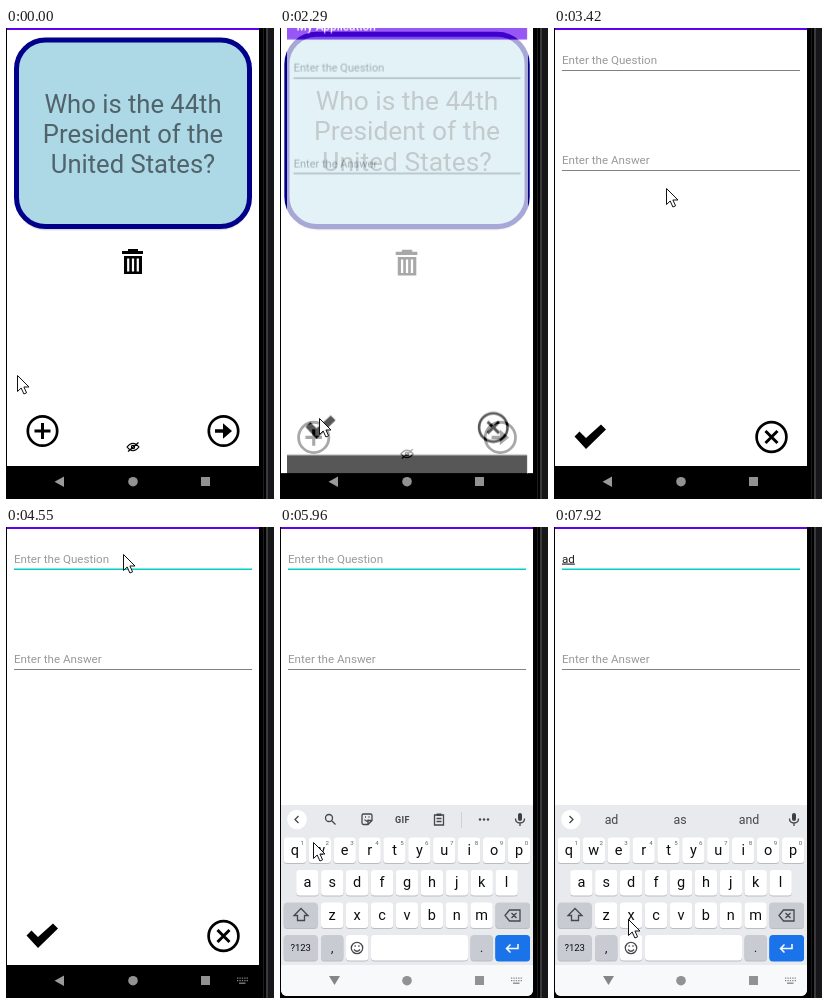
An HTML page for the animation above (8 s loop, 268 by 471 pixels).

```html
<!DOCTYPE html>
<html lang="en">
<head>
<meta charset="utf-8">
<title>Flashcard app</title>
<style>
html, body { margin: 0; width: 100%; height: 100%; overflow: hidden; background: #000; }
svg { display: block; width: 100vw; height: 100vh; font-family: Roboto, "Open Sans", sans-serif; }
.mid { text-anchor: middle; }
.hint { font-size: 11.6px; fill: #999; }
.typed { font-size: 11.6px; fill: #222; text-decoration: underline; }
.question { font-size: 25.6px; fill: #50636a; }
.ring { fill: none; stroke: #000; stroke-width: 2.7; }
.thin { fill: none; stroke: #44474b; stroke-width: 1.3; }
.word { font-size: 12.4px; fill: #44474b; }
.key { font-size: 14.5px; fill: #0c0d0f; }
.digit { font-size: 6.2px; fill: #5f6368; }

/* every state holds until the next one; 1% is 80 ms */
.anim { animation: 8s step-end -4ms infinite; }
#home { animation-name: home; }
#form { animation-name: form; }
#focus { animation-name: focus; }
#kbIcon { animation-name: kbIcon; }
#board { animation-name: board; }
.light { animation-name: light; }
.dark { animation-name: dark; }
#hintQ { animation-name: untilA; }
#tools { animation-name: untilWords; }
#a { animation-name: a; }
#ad { animation-name: ad; }
#words1 { animation-name: words1; }
#words2 { animation-name: words2; }
#words { animation-name: words; }
#caret { animation-name: caret; }
#mouse { animation-name: mouse; }

@keyframes home {
  0% { transform: none; opacity: 1; }
  28.625% { transform: matrix(1.031, 0, 0, 1.031, -3.9, -6.1); opacity: 1; }
  30.125%, 100% { transform: none; opacity: 0; }
}
@keyframes form {
  0% { transform: none; opacity: 0; }
  28.625% { transform: matrix(.953, 0, 0, .953, 6, 9.6); opacity: .66; }
  30.125% { transform: matrix(.998, 0, 0, .998, .25, .6); opacity: 1; }
  32%, 100% { transform: none; opacity: 1; }
}
@keyframes focus { 0% { opacity: 0; } 48.625%, 100% { opacity: 1; } }
@keyframes kbIcon { 0% { opacity: 0; } 55.75%, 100% { opacity: 1; } }
@keyframes board {
  0% { transform: translateY(200px); }
  58.75% { transform: translateY(70px); }
  60.625%, 100% { transform: none; }
}
@keyframes light { 0% { opacity: 0; } 58.75%, 100% { opacity: 1; } }
@keyframes dark { 0% { opacity: 1; } 58.75%, 100% { opacity: 0; } }
@keyframes untilA { 0% { opacity: 1; } 79.875%, 100% { opacity: 0; } }
@keyframes untilWords { 0% { opacity: 1; } 81.625%, 100% { opacity: 0; } }
@keyframes words { 0% { opacity: 0; } 81.625%, 100% { opacity: 1; } }
@keyframes a { 0% { opacity: 0; } 79.875% { opacity: 1; } 93.75%, 100% { opacity: 0; } }
@keyframes ad { 0% { opacity: 0; } 93.75%, 100% { opacity: 1; } }
@keyframes words1 { 0% { opacity: 1; } 95.5%, 100% { opacity: 0; } }
@keyframes words2 { 0% { opacity: 0; } 95.5%, 100% { opacity: 1; } }
@keyframes caret {
  0% { opacity: 0; transform: translateX(8px); }
  52.375% { opacity: 1; transform: translateX(8px); }
  55.75% { opacity: 0; transform: translateX(8px); }
  62.5% { opacity: 1; transform: translateX(8px); }
  68% { opacity: 0; transform: translateX(8px); }
  74.625% { opacity: 1; transform: translateX(8px); }
  79.875% { opacity: 1; transform: translateX(14px); }
  86.5% { opacity: 0; transform: translateX(14px); }
  92.25% { opacity: 1; transform: translateX(14px); }
  93.75% { opacity: 1; transform: translateX(20.5px); }
  99%, 100% { opacity: 0; transform: translateX(20.5px); }
}
@keyframes mouse {
  0% { transform: translate(11px, 347px); }
  1.625% { transform: translate(15px, 355px); }
  3.375% { transform: translate(25px, 371px); }
  5.125% { transform: translate(36px, 386px); }
  6.875% { transform: translate(39px, 390px); }
  39.375% { transform: translate(60px, 325px); }
  41.125% { transform: translate(112px, 160px); }
  43% { transform: translate(138px, 45px); }
  44.875% { transform: translate(117px, 27px); }
  66.25% { transform: translate(112px, 45px); }
  68% { transform: translate(96px, 100px); }
  69.625% { transform: translate(73px, 180px); }
  71.25% { transform: translate(50px, 258px); }
  73% { transform: translate(33px, 315px); }
  74.625% { transform: translate(25px, 342px); }
  76.375% { transform: translate(23px, 350px); }
  81.625% { transform: translate(34px, 352px); }
  83.375% { transform: translate(60px, 353px); }
  85.375% { transform: translate(73px, 352px); }
  97.25% { transform: translate(74px, 373px); }
  99%, 100% { transform: translate(74px, 392px); }
}
</style>
</head>
<body>
<svg viewBox="0 0 268 471" preserveAspectRatio="none">
  <defs>
    <clipPath id="screen"><rect x="1" y="-20" width="252" height="489" rx="6"/></clipPath>
  </defs>
  <rect width="268" height="471"/>

  <!-- phone edge -->
  <rect x="257" width="1" height="471" fill="#1c1c1e"/>
  <rect x="260" width="2" height="471" fill="#3a3a3d"/>
  <rect x="262" width="6" height="471" fill="#17171a"/>

  <g clip-path="url(#screen)">
    <g id="home" class="anim">
      <rect x="-8" y="-10" width="270" height="448" fill="#fff"/>
      <rect x="-8" y="-40" width="270" height="42" fill="#6200ee"/>
      <rect x="9" y="12" width="236" height="190.5" rx="31" fill="#000" opacity=".12"/>
      <rect x="10.5" y="12" width="233" height="186.5" rx="29" fill="#add8e6" stroke="#00008b" stroke-width="5"/>
      <g class="question mid">
        <text x="127" y="85">Who is the 44th</text>
        <text x="127" y="115">President of the</text>
        <text x="127" y="145">United States?</text>
      </g>
      <path d="M116 223h6v-2h10v2h5v3h-21zM118 228h18v18h-18z"/>
      <path d="M122.2 230.500v13M127 230.500v13M131.800 230.500v13" stroke="#fff" stroke-width="2.200"/>
      <circle class="ring" cx="36.500" cy="403" r="14.700"/>
      <path d="M36.500 395v16M28.500 403h16" stroke="#000" stroke-width="3"/>
      <circle class="ring" cx="217.500" cy="403" r="14.700"/>
      <path d="M209 401.300h8v-6l9 7.700-9 7.700v-6h-8z"/>
      <g fill="none" stroke="#000" stroke-width="1.200">
        <path d="M121 419q6-7.500 12 0q-6 7.500-12 0zM122 423.500l10.500-9"/>
        <circle cx="127" cy="419" r="1.600"/>
      </g>
      <rect x="-8" y="438" width="270" height="40"/>
    </g>

    <g id="form" class="anim">
      <rect x="1" y="0" width="252" height="438" fill="#fff"/>
      <rect x="1" y="-40" width="252" height="42" fill="#6200ee"/>
      <text x="11" y="-8" font-size="12.500" font-weight="500" fill="#fff">My Application</text>
      <text id="hintQ" class="hint anim" x="8" y="35.500">Enter the Question</text>
      <text class="hint" x="8" y="136">Enter the Answer</text>
      <path d="M8 42.500h238M8 142.500h238" stroke="#808080"/>
      <rect id="focus" class="anim" x="8" y="41.500" width="238" height="1.500" fill="#03d0c0"/>
      <path d="M20.500 408.500l5-5 6.500 6.500 15-13.500 5 5-20 19.500z"/>
      <circle class="ring" cx="217.500" cy="409" r="14.900"/>
      <path d="M211.500 403l12 12M223.500 403l-12 12" stroke="#000" stroke-width="3"/>
      <rect x="1" y="438" width="252" height="33"/>
    </g>

    <text id="a" class="typed anim" x="8" y="35.500">a</text>
    <text id="ad" class="typed anim" x="8" y="35.500">ad</text>
    <rect id="caret" class="anim" y="23" width="1.200" height="17" fill="#03d0c0"/>

    <g id="board" class="anim">
      <rect x="1" y="278" width="252" height="193" fill="#e8eaed"/>
      <circle cx="17" cy="292.500" r="9.800" fill="#fff"/>
      <g id="tools" class="anim">
        <path class="thin" d="M18.500 289l-3.500 3.500 3.500 3.500"/>
        <circle class="thin" cx="49" cy="291" r="3.500"/>
        <path class="thin" d="M51.500 293.500l4 4"/>
        <path class="thin" d="M82 288.500q0-1.500 1.500-1.500h7q1.500 0 1.500 1.500v5l-4 4h-4.500q-1.500 0-1.500-1.500zM92 293.500h-4v4M84.500 292.500q2 3 4 0M85 290h1M88.500 290h1"/>
        <text class="mid" x="122.500" y="295.500" font-size="9" font-weight="700" letter-spacing=".4" fill="#44474b">GIF</text>
        <path class="thin" d="M154.500 288h9v10h-9zM156.500 291.500h5M156.500 294.500h5"/>
        <rect x="156.500" y="286.500" width="5" height="2.500" fill="#44474b"/>
        <path d="M181.500 285v16" stroke="#cfd2d6"/>
        <g fill="#44474b"><circle cx="200" cy="292.500" r="1.200"/><circle cx="204" cy="292.500" r="1.200"/><circle cx="208" cy="292.500" r="1.200"/></g>
      </g>
      <g id="words" class="anim">
        <path class="thin" d="M15.500 289l3.500 3.500-3.500 3.500"/>
        <g id="words1" class="word mid anim">
          <text x="57.500" y="297">a</text><text x="126" y="297">and</text><text x="195" y="297">also</text>
        </g>
        <g id="words2" class="word mid anim">
          <text x="57.500" y="297">ad</text><text x="126" y="297">as</text><text x="195" y="297">and</text>
        </g>
      </g>
      <rect x="238" y="286" width="4" height="8" rx="2" fill="#3c4043"/>
      <path class="thin" d="M235.500 291.500q0 4.500 4.500 4.500t4.500-4.500M240 296v3"/>
      <g id="keys"></g>
      <path class="thin" d="M21 381.500l7 7h-3.500v5h-7v-5H14z"/>
      <path class="thin" d="M225 388.500l4.500-5.500h10.500v11h-10.500zM231.500 386l5 5M236.500 386l-5 5"/>
      <circle class="thin" cx="77" cy="421" r="5.700"/>
      <path class="thin" d="M74 422.500q3 3.500 6 0M74.500 419h1.300M78.300 419h1.300"/>
      <path d="M238 417v4.500h-11M230.500 417.500l-4 4 4 4" fill="none" stroke="#fff" stroke-width="1.500"/>
    </g>

    <!-- navigation bar -->
    <rect class="light anim" x="1" y="438" width="252" height="33" fill="#f8f9fa"/>
    <path class="light anim" d="M49 449h11l-5.500 9z" fill="#858585"/>
    <g class="dark anim">
      <rect x="1" y="445.500" width="252" height="26"/>
      <path d="M58 448.500v10.500l-9.500-5.250z" fill="#9a9a9a"/>
    </g>
    <circle cx="127" cy="453.700" r="4.800" fill="#929292"/>
    <rect x="195" y="449" width="9" height="9" fill="#929292"/>
    <g id="kbIcon" class="anim" stroke="#858585" stroke-width="1.300">
      <path d="M231 451.200h11M231 453.700h11" stroke-dasharray="1.300 1.100"/>
      <path d="M233 456.200h6.500"/>
    </g>
  </g>

  <path id="mouse" class="anim" d="M.5 .5v16l3.700-3.500 2.700 6 2.700-1.200-2.700-5.800h5.100z" fill="#fff" stroke="#111" stroke-linejoin="round"/>
</svg>
<script>
const keys = document.getElementById('keys');

function add(tag, attrs, text = '') {
  const el = document.createElementNS('http://www.w3.org/2000/svg', tag);
  for (const name in attrs) el.setAttribute(name, attrs[name]);
  el.textContent = text;
  keys.append(el);
}

function key(x, y, width, label = '', fill = '#fff', size = 14.5, shade = '#b9bcc1') {
  const box = { x, width, height: 25.5, rx: 3.5 };
  add('rect', { ...box, y: y + 1, fill: shade });
  add('rect', { ...box, y, fill });
  add('text', { class: 'key mid', x: x + width / 2, y: y + 12.5 + size * .34, style: `font-size:${size}px` }, label);
}

function row(letters, x, y) {
  [...letters].forEach((letter, i) => key(x + i * 24.9, y, 22.4, letter));
}

row('qwertyuiop', 3.7, 310.5);
[...'1234567890'].forEach((n, i) => add('text', { class: 'digit mid', x: 22.3 + i * 24.9, y: 317.5 }, n));
row('asdfghjkl', 16.2, 343);
row('zxcvbnm', 41, 375.5);

const grey = '#c8ccd2';
const blue = '#1a73e8';
key(3.7, 375.5, 34, '', grey);
key(215.4, 375.5, 34.6, '', grey);
key(3.7, 408, 34, '?123', grey, 9.5);
key(41, 408, 22.4, ',', grey, 12);
key(66, 408, 22.4);
key(91, 408, 97);
key(190.5, 408, 22.4, '.', grey, 12);
key(215.4, 408, 34.6, '', blue, 14.5, blue);
</script>
</body>
</html>
```
